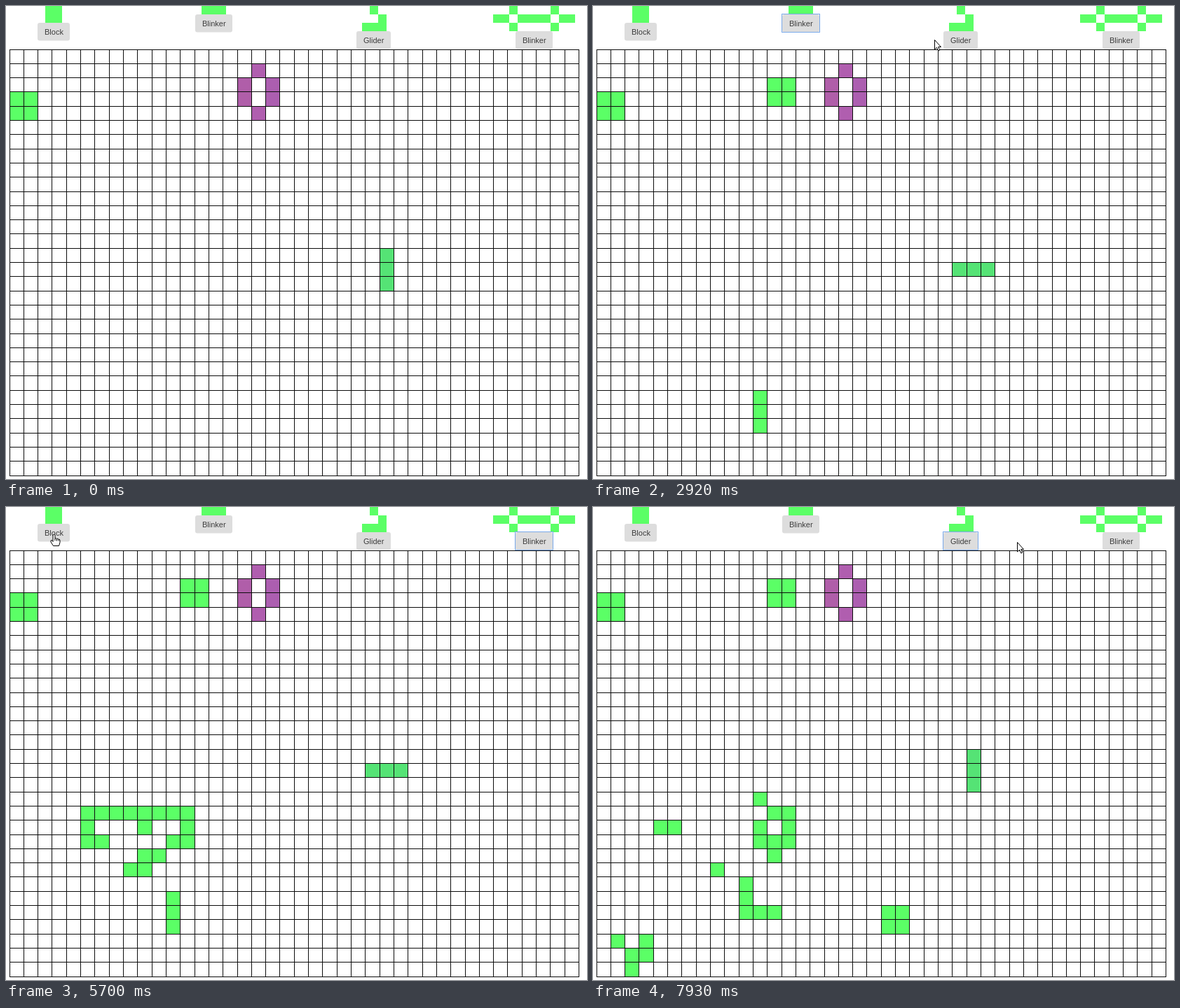
These frames come from a looping animation (829 by 676 pixels, 8 s). An HTML page with a canvas:

```html
<!DOCTYPE html>
<html lang="en">
<head>
<meta charset="utf-8">
<title>Game of Life</title>
<style>
  html, body { margin: 0; width: 100%; height: 100%; overflow: hidden; background: #fff; }
  canvas { display: block; }
</style>
</head>
<body>
<canvas id="stage" width="829" height="676"></canvas>
<script>
const ctx = document.getElementById('stage').getContext('2d');
const LOOP = 8000, STEP = 1000 / 13, GENERATION = 1000, FIRST_GENERATION = 770;
const COLS = 40, ROWS = 30, PREVIEW_CELL = 11.72;
const GREEN = '#5bff66';

ctx.font = '11px "Liberation Sans", Arial, sans-serif';
ctx.lineWidth = 1;

const shapes = {
  block: ['##', '##'],
  blinker: ['###'],
  glider: [' # ', '  #', '###'],
  pentadecathlon: ['  #    #  ', '## #### ##', '  #    #  '],
  beehive: [' # ', '# #', '# #', ' # '],
  column: ['#', '#', '#'],
};

const buttons = [
  ['Block', 'block'], ['Blinker', 'blinker'], ['Glider', 'glider'], ['Blinker', 'pentadecathlon'],
].map(([label, shape], i) => {
  const centre = 68.1 + 228.5 * i, width = ctx.measureText(label).width + 20;
  return {
    label, shape, centre,
    x: Math.round(centre - width / 2), y: 12 * shapes[shape].length,
    width: Math.floor(width), height: 25.5,
  };
});
const buttonAt = (x, y) => buttons.find(b =>
  x >= b.x && x < b.x + b.width && y >= b.y && y < b.y + b.height);

// The pointer's story: stops to travel between, and clicks that drop a shape.
const stops = [], clicks = [];
function move(time, travel, x, y, stay = 0) {
  stops.push({ time, travel, x, y, leave: time + stay });
}
function click(time, x, y, col, row) {
  move(time - 170, 700, x, y, 270);
  clicks.push({ time, press: time - 100, button: buttonAt(x, y), col, row });
}
move(440, 0, 747, 668);
click(1390, 78, 43, 12, 2);
click(2140, 290, 31, 10, 25);
click(3210, 527, 52, 7, 19);
move(3690, 150, 762, 69);
click(4610, 752, 48, 4, 18);
move(4769, 140, 473, 52);
click(5840, 68, 38, 20, 25);
click(6590, 290, 18, 5, 16);
click(7370, 522, 42, 1, 26);
move(7923, 220, 605, 50);

const lineX = col => Math.floor(5 + col * 20.3125);
const lineY = row => Math.floor(62 + row * 20.3);

function eachCell(shape, visit) {
  shapes[shape].forEach((row, y) =>
    [...row].forEach((mark, x) => mark === '#' && visit(x, y)));
}

function place(cells, shape, col, row) {
  eachCell(shape, (x, y) => { cells[(row + y) * COLS + col + x] = 1; });
}

function nextGeneration(cells) {
  return cells.map((alive, i) => {
    const col = i % COLS, row = Math.floor(i / COLS);
    let count = -alive;
    for (let y = Math.max(0, row - 1); y <= Math.min(ROWS - 1, row + 1); y++)
      for (let x = Math.max(0, col - 1); x <= Math.min(COLS - 1, col + 1); x++)
        count += cells[y * COLS + x];
    return count === 3 || (alive && count === 2) ? 1 : 0;
  });
}

function buildHistory() {
  let cells = new Uint8Array(COLS * ROWS);
  place(cells, 'block', 0, 3);
  place(cells, 'beehive', 16, 1);
  place(cells, 'column', 26, 14);
  const history = [{ time: 0, cells }];
  const events = [...clicks];
  for (let time = FIRST_GENERATION; time < LOOP; time += GENERATION) events.push({ time });
  events.sort((a, b) => a.time - b.time);
  for (const { time, button, col, row } of events) {
    cells = button ? cells.slice() : nextGeneration(cells);
    if (button) place(cells, button.shape, col, row);
    history.push({ time, cells });
  }
  return history;
}
const history = buildHistory();

function cellColour(col, row) {
  if (row < 6 && col >= 16 && col <= 18) return `hsl(${305 - (col - 16) * 4} 34% 53%)`;
  return col > 24 ? '#55e375' : GREEN;
}

function fillBox(left, top, right, bottom) {
  ctx.fillRect(left, top, right - left, bottom - top);
}

function drawButton({ label, shape, centre, x, y, width, height }, focused) {
  const left = centre - shapes[shape][0].length * PREVIEW_CELL / 2;
  const edgeX = n => Math.round(left + n * PREVIEW_CELL);
  const edgeY = n => Math.ceil(n * PREVIEW_CELL);
  ctx.fillStyle = GREEN;
  eachCell(shape, (col, row) =>
    fillBox(edgeX(col), edgeY(row), edgeX(col + 1), edgeY(row + 1)));

  ctx.fillStyle = '#ddd';
  ctx.beginPath();
  ctx.roundRect(x, y, width, height, 3);
  ctx.fill();
  if (focused) {
    ctx.strokeStyle = '#79a9ea';
    ctx.strokeRect(x - .5, y - .5, width + 1, 26);
  }
  ctx.fillStyle = '#3c3c3c';
  ctx.fillText(label, x + 10, y + 17);
}

function drawGrid(cells) {
  cells.forEach((alive, i) => {
    if (!alive) return;
    const col = i % COLS, row = Math.floor(i / COLS);
    ctx.fillStyle = cellColour(col, row);
    fillBox(lineX(col), lineY(row), lineX(col + 1), lineY(row + 1));
  });
  ctx.fillStyle = '#0c0c0c';
  for (let col = 0; col <= COLS; col++) ctx.fillRect(lineX(col), 62, 1, 610);
  for (let row = 0; row <= ROWS; row++) ctx.fillRect(5, lineY(row), 813, 1);
}

const arrow = new Path2D('M0 0V13.5L3 10.8L5.3 15.5L7.3 14.6L5.2 10H9Z');
const hand = new Path2D('M-1.5 11V1.5Q0 -.5 1.5 1.5V6.5Q3 5.5 4 7Q5.5 6 6.5 7.8' +
  'Q8.5 7 8.5 9.5V12L7 17H-1L-4.5 11.5Q-5 8.5 -3 9ZM1.5 6.5V9.5M4 7V10M6.5 7.8V10');

function pointerPosition(t) {
  const next = stops.findIndex(stop => stop.time > t);
  const to = stops.at(next), from = next > 0 ? stops[next - 1] : to;
  const start = Math.max(from.leave, to.time - to.travel);
  const part = to === from ? 1 : Math.max(0, (t - start) / (to.time - start));
  return [from.x + (to.x - from.x) * part, from.y + (to.y - from.y) * part].map(Math.round);
}

function drawPointer(t) {
  if (t < stops[0].time) return;
  const [x, y] = pointerPosition(t);
  const icon = buttonAt(x, y) ? hand : arrow;
  ctx.save();
  ctx.translate(x + .5, y + .5);
  ctx.fillStyle = '#fff';
  ctx.strokeStyle = '#000';
  ctx.fill(icon);
  ctx.stroke(icon);
  ctx.restore();
}

function draw(now) {
  const t = Math.floor((now % LOOP + 15) / STEP) * STEP;
  const focused = clicks.findLast(c => c.press <= t)?.button;
  ctx.fillStyle = '#fff';
  ctx.fillRect(0, 0, 829, 676);
  buttons.forEach(button => drawButton(button, button === focused));
  drawGrid(history.findLast(state => state.time <= t).cells);
  drawPointer(t);
}

const start = performance.now();
function frame() {
  draw(performance.now() - start);
  requestAnimationFrame(frame);
}
frame();
</script>
</body>
</html>
```
